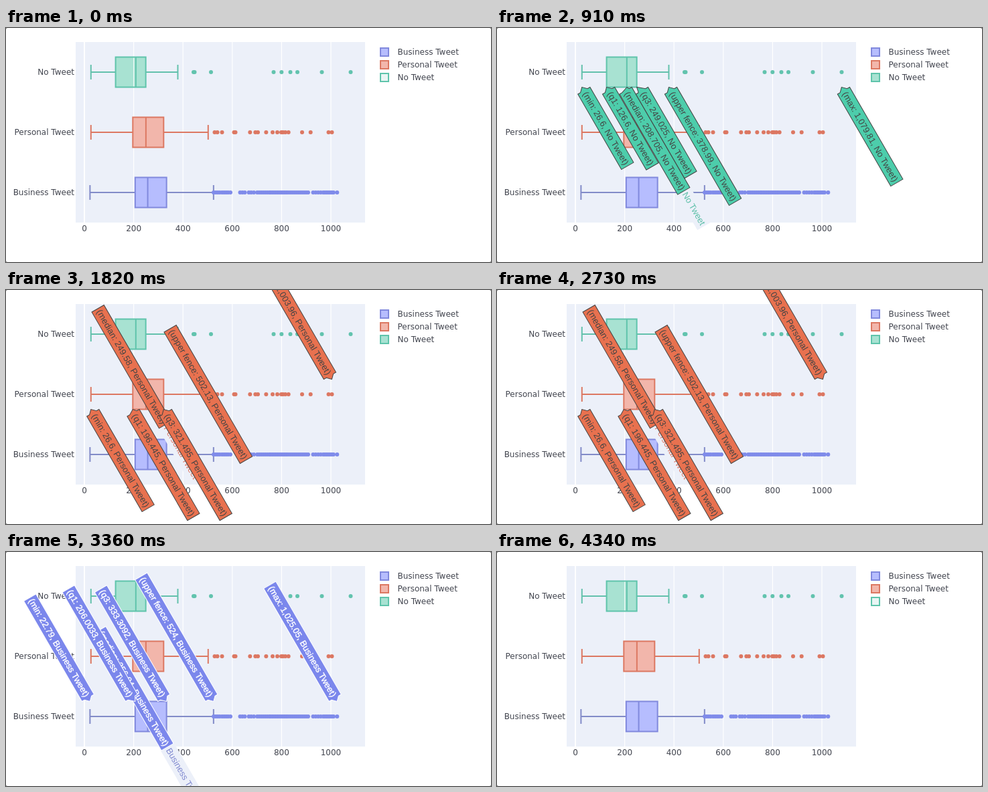
An HTML page for the animation above (4410 ms loop, 724 by 350 pixels).

```html
<!DOCTYPE html>
<html lang="en">
<head>
<meta charset="utf-8">
<title>Box plot hover</title>
<style>
  html, body { margin: 0; width: 100%; height: 100%; overflow: hidden; background: #fff; }
  svg { display: block; width: 724px; height: 350px; }
  .axis { font: 12px "DejaVu Sans", Verdana, sans-serif; fill: #42454f; }
  .tip { font: 13px "Liberation Sans", Arial, sans-serif; }
</style>
</head>
<body>
<svg id="stage" viewBox="0 0 724 350" xmlns="http://www.w3.org/2000/svg"></svg>
<script>
const LOOP = 4410;
const PLOT_BG = '#ecf0f9';
const HALF_BOX = 22.5;
const TIP_HEIGHT = 21;
const ARROW = 6;
const PAD = 3;
const stage = document.getElementById('stage');
const px = value => 117 + value * 0.368;

function add(parent, tag, attrs, text) {
  const node = document.createElementNS('http://www.w3.org/2000/svg', tag);
  for (const key in attrs) node.setAttribute(key, attrs[key]);
  if (text !== undefined) node.textContent = text;
  parent.appendChild(node);
  return node;
}

// Evenly spaced values from a to b, both included
function span(a, b, step) {
  const n = Math.round((b - a) / step);
  return Array.from({ length: n + 1 }, (_, i) => a + (b - a) * i / n);
}

// Tips: [name, value text, anchor, sideways shift]
const traces = [
  {
    name: 'Business Tweet', y: 246, from: 2800, to: 3780,
    line: '#8189dd', whisker: '#828bc8', fill: '#b6bdfe', dot: '#7f8bea',
    tipFill: '#7b87ec', tipInk: '#fff', nameInk: '#7f88cf',
    stats: [22.79, 206.0033, 256.94, 333.3092, 524], max: 1025.05,
    dots: [...span(310, 319, 3), ...span(322.5, 331.5, 3), 335,
      ...span(349.5, 356.5, 3.5), 362.5, 366, 370, ...span(375, 393, 3),
      ...span(395, 421, 2.6), ...span(424, 451, 3), ...span(458.5, 473.5, 3.5),
      ...span(476, 489, 2.6), 494.3],
    tips: [
      ['median', '256.94', 'middle', 3.1], ['min', '22.79', 'end', 0],
      ['q1', '206.0033', 'end', -2.4], ['q3', '333.3092', 'end', -0.9],
      ['upper fence', '524', 'end', 0], ['max', '1,025.05', 'end', 0]
    ]
  },
  {
    name: 'Personal Tweet', y: 156, from: 1610, to: 2800,
    line: '#dc7862', whisker: '#dc7862', fill: '#f2b6ab', dot: '#dc7762',
    tipFill: '#e8714f', tipInk: '#444', nameInk: '#dd7a66',
    stats: [26.6, 196.445, 249.58, 321.495, 502.13], max: 1003.96,
    dots: [311.5, 315.5, 322.5, 340.5, 342.5, 364.3, 372.3, 376, 388.3, 398, 405,
      411, 413.5, 417, 421.7, 442, 454.7, 481.5, 486.5],
    tips: [
      ['median', '249.58', 'middle', 2.35], ['min', '26.6', 'start', 0],
      ['q1', '196.445', 'start', -2.35], ['q3', '321.495', 'start', 0],
      ['upper fence', '502.13', 'middle', 0], ['max', '1,003.96', 'end', 0]
    ]
  },
  {
    name: 'No Tweet', y: 66, from: 840, to: 1610,
    line: '#5fc4ab', whisker: '#63c1ac', fill: '#a8e2d2', dot: '#62c3ae',
    tipFill: '#4dcdab', tipInk: '#444', nameInk: '#5cbfa8',
    stats: [26.6, 126.6, 208.705, 249.025, 378.99], max: 1079.81,
    dots: [280, 281.5, 306, 399.5, 411.3, 424.5, 435, 471.5, 514.5],
    tips: [
      ['median', '208.705', 'start', -4.75], ['min', '26.6', 'start', 0],
      ['q1', '126.6', 'start', 0], ['q3', '249.025', 'start', 4.75],
      ['upper fence', '378.99', 'start', 0], ['max', '1,079.81', 'start', 0]
    ]
  }
];
const statNames = ['min', 'q1', 'median', 'q3', 'upper fence'];

function drawAxes() {
  add(stage, 'rect', { width: 724, height: 350, fill: '#777' });
  add(stage, 'rect', { width: 724, height: 350, rx: 2.5, fill: '#fff' });
  add(stage, 'rect', { x: 104, y: 21, width: 432, height: 270, fill: PLOT_BG });
  for (let v = 0; v <= 1000; v += 200) {
    add(stage, 'path', { d: `M${px(v)} 21V291`, stroke: '#fff', 'stroke-width': v ? 1.2 : 2 });
    add(stage, 'text', { class: 'axis', x: px(v), y: 304, 'text-anchor': 'middle' }, v);
  }
}

function drawTrace(t, i) {
  const [min, q1, median, q3, fence] = t.stats.map(px);
  const top = t.y - HALF_BOX, bottom = t.y + HALF_BOX;
  add(stage, 'path', {
    d: `M${min} ${t.y}H${q1}M${q3} ${t.y}H${fence}M${min} ${t.y - 11}v22M${fence} ${t.y - 11}v22`,
    stroke: t.whisker, 'stroke-width': 2, fill: 'none'
  });
  add(stage, 'rect', { x: q1, y: top, width: q3 - q1, height: 2 * HALF_BOX, fill: t.fill });
  if (i === 2) t.glint = add(stage, 'path', {
    d: `M${px(200)} ${top}V${bottom}`, stroke: '#fff', 'stroke-width': 1.2, opacity: 0.85
  });
  add(stage, 'path', {
    d: `M${q1} ${top}H${q3}V${bottom}H${q1}ZM${median} ${top}V${bottom}`,
    stroke: t.line, 'stroke-width': 2, fill: 'none'
  });
  for (const x of t.dots) add(stage, 'circle', { cx: x, cy: t.y, r: 3, fill: t.dot });
  add(stage, 'text', { class: 'axis', x: 102, y: t.y + 4.3, 'text-anchor': 'end' }, t.name);

  const ly = 36 + 19 * i;
  t.swatch = add(stage, 'rect', {
    x: 559, y: ly - 6, width: 12, height: 12, fill: t.fill, stroke: t.line, 'stroke-width': 2
  });
  add(stage, 'text', { class: 'axis', x: 584.5, y: ly + 4.3 }, t.name);
}

// A hover label turned by 60 degrees; the arrow stays on the value when the body shifts
function drawTip(t, [stat, value, anchor, shift]) {
  const x = px(stat === 'max' ? t.max : t.stats[statNames.indexOf(stat)]);
  const side = { start: 1, middle: 0, end: -1 }[anchor];
  const g = add(t.group, 'g', {
    class: 'tip', transform: `translate(${x} ${t.y + side * HALF_BOX}) rotate(60)`
  });
  const dx = shift * Math.cos(Math.PI / 3), dy = -shift * Math.sin(Math.PI / 3);
  const half = TIP_HEIGHT / 2;
  const body = add(g, 'path', { fill: t.tipFill, stroke: t.tipInk, 'stroke-width': 1 });
  const label = add(g, 'text', { y: dy + 4.5, fill: t.tipInk }, `(${stat}: ${value}, ${t.name})`);
  if (t.tipInk === '#fff') {
    label.setAttribute('stroke', '#fff');
    label.setAttribute('stroke-width', 0.4);
  }
  const width = label.getComputedTextLength() + 2 * PAD;

  let extra = null, extraWidth = 0;
  if (stat === 'median') {
    extra = add(g, 'text', { y: dy + 4.5, fill: t.nameInk }, t.name);
    extraWidth = extra.getComputedTextLength() + 2 * PAD;
  }

  const left = dx + (side > 0 ? ARROW : side < 0 ? -ARROW - width : -(width + extraWidth) / 2);
  const near = dx + side * ARROW;
  body.setAttribute('d', side
    ? `M0 0L${near} ${dy + ARROW}V${dy + half}h${side * width}v${-TIP_HEIGHT}H${near}V${dy - ARROW}Z`
    : `M${left} ${dy - half}h${width}v${TIP_HEIGHT}h${-width}Z`);
  label.setAttribute('x', left + PAD);

  if (extra) {
    extra.setAttribute('x', left + width + PAD);
    const back = add(g, 'rect', {
      x: left + width, y: dy - half - 1, width: extraWidth, height: TIP_HEIGHT + 2, fill: PLOT_BG
    });
    g.insertBefore(back, body);
  }
}

drawAxes();
traces.forEach(drawTrace);
for (const t of traces) {
  t.group = add(stage, 'g', {});
  t.tips.forEach(tip => drawTip(t, tip));
}

function render(time) {
  for (const t of traces) {
    t.group.style.display = time >= t.from && time < t.to ? '' : 'none';
  }
  const idle = time < 840 || time >= 3780;
  const green = traces[2];
  green.glint.style.display = idle ? '' : 'none';
  green.swatch.setAttribute('fill', idle ? '#e9f5f4' : green.fill);
}

const begin = performance.now();
function tick() {
  render((performance.now() - begin) % LOOP);
  requestAnimationFrame(tick);
}
render(0);
requestAnimationFrame(tick);
</script>
</body>
</html>
```
